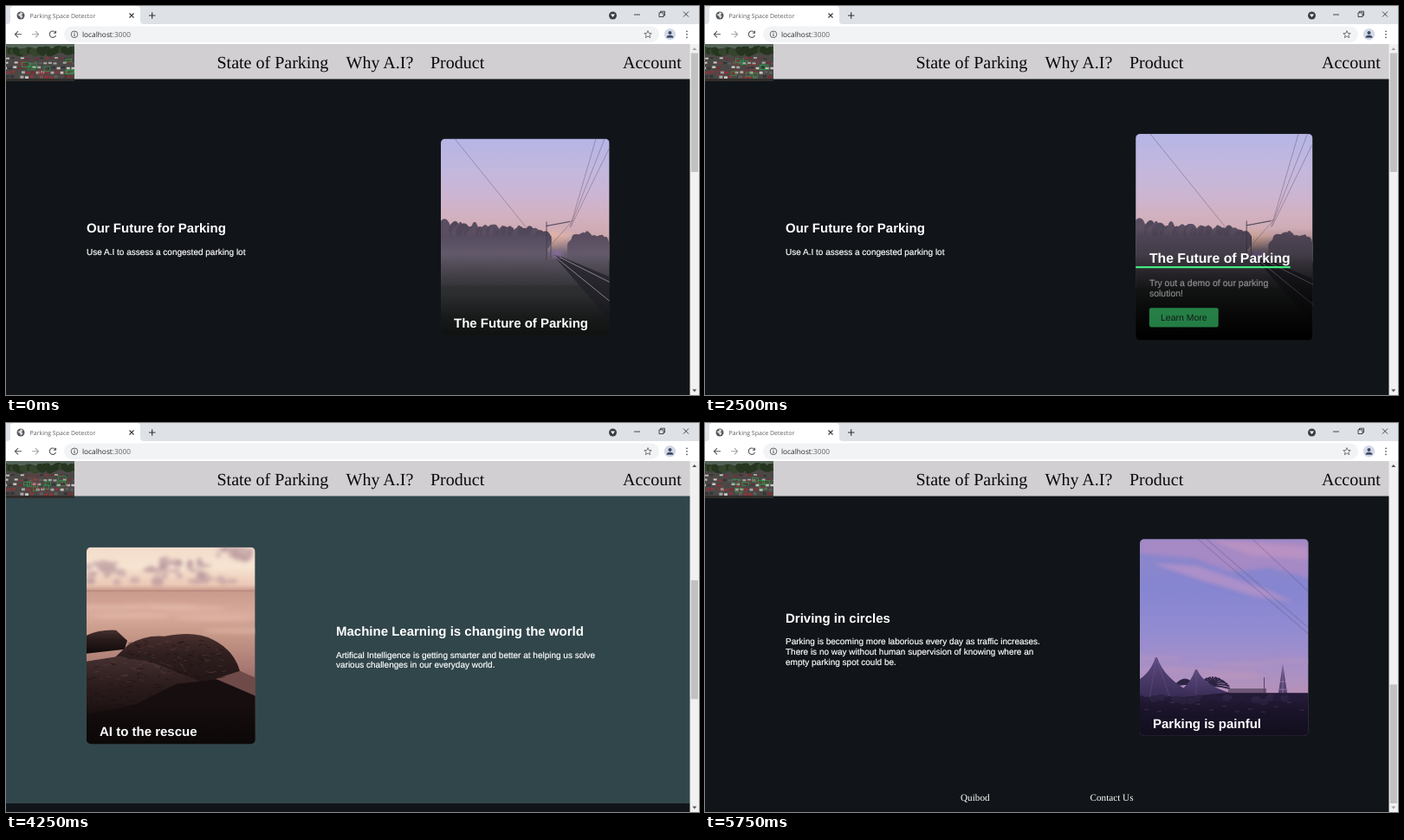
Write an HTML page that moves like this. It is 800 px wide and 450 px high and loops after 5800 ms.

```html
<!DOCTYPE html>
<html lang="en">
<head>
<meta charset="utf-8">
<title>Parking Space Detector</title>
<style>
  html, body { margin: 0; width: 100%; height: 100%; overflow: hidden; background: #111519; }
  svg { display: block; width: 800px; height: 450px; }
  text { white-space: pre; text-rendering: geometricPrecision; }
  .sans { font-family: "Liberation Sans", Arial, sans-serif; fill: #fff; }
  .serif { font-family: "Liberation Serif", "Times New Roman", serif; }
  .ui { font-family: "Open Sans", "Noto Sans", sans-serif; }
  .h { font-size: 15px; font-weight: 700; }
  .p { font-size: 10px; stroke: #fff; stroke-width: .18; }
  .dark { fill: #1d2a22; stroke: none; }
  .nav { font-size: 20px; fill: #0a0a0a; }
  .foot { font-size: 11.2px; fill: #fff; }
  .icon { fill: none; stroke: #55585d; stroke-width: 1.1; }
  .wire { fill: none; stroke: #4b4560; stroke-width: .5; opacity: .75; }
</style>
</head>
<body>
<svg id="stage" viewBox="0 0 800 450" xmlns="http://www.w3.org/2000/svg"></svg>
<script>
const LOOP = 5800, STEP = 50;
const HOVER_ON = 1250, HOVER_OFF = 3033, FADE = 500;
const CARD_W = 194.6, CARD_H = 227.6, SLIDE = 76.7;
const MAX_SCROLL = 731;
const SCROLL = [[3250, 0], [3750, 186], [4250, 375.5], [5100, 612.5], [5650, MAX_SCROLL]];

function seeded(seed) {
  return () => {
    seed = (seed * 1664525 + 1013904223) >>> 0;
    return seed / 4294967296;
  };
}
const clamp = v => Math.max(0, Math.min(1, v));
const repeat = (n, fn) => Array.from({ length: n }, (_, i) => fn(i)).join('');

// cubic-bezier(.25, .1, .25, 1)
function ease(x) {
  x = clamp(x);
  let lo = 0, hi = 1, s = x;
  for (let i = 0; i < 24; i++) {
    s = (lo + hi) / 2;
    const bx = .75 * s * (1 - s) + s * s * s;
    if (bx < x) lo = s; else hi = s;
  }
  return .3 * s * (1 - s) ** 2 + 3 * s * s * (1 - s) + s ** 3;
}

function hover(t, delay, curve) {
  return t < HOVER_OFF
    ? curve((t - HOVER_ON - delay) / FADE)
    : 1 - curve((t - HOVER_OFF) / FADE);
}

const slope = i => (SCROLL[i + 1][1] - SCROLL[i][1]) / (SCROLL[i + 1][0] - SCROLL[i][0]);
const tangent = i => i === 0 || i === SCROLL.length - 1 ? 0 : (slope(i - 1) + slope(i)) / 2;

function scrollAt(t) {
  const last = SCROLL.length - 1;
  if (t <= SCROLL[0][0]) return 0;
  if (t >= SCROLL[last][0]) return MAX_SCROLL;
  const i = SCROLL.findIndex((p, k) => k < last && t < SCROLL[k + 1][0]);
  const [t0, a] = SCROLL[i], [t1, b] = SCROLL[i + 1];
  const d = t1 - t0, u = (t - t0) / d, v = 1 - u;
  return a * v * v * (1 + 2 * u) + b * u * u * (3 - 2 * u)
    + d * u * v * (v * tangent(i) - u * tangent(i + 1));
}

const gradient = (id, ...stops) =>
  `<linearGradient id="${id}" x2="0" y2="1">` + stops.map(([at, color, alpha = 1]) =>
    `<stop offset="${at}" stop-color="${color}" stop-opacity="${alpha}"/>`).join('') + '</linearGradient>';
const text = (x, y, cls, str, extra = '') => `<text x="${x}" y="${y}" class="${cls}" ${extra}>${str}</text>`;
const rect = (x, y, w, h, fill, extra = '') =>
  `<rect x="${x}" y="${y}" width="${w}" height="${h}" fill="${fill}" ${extra}/>`;
const path = (d, fill, extra = '') => `<path d="${d}" fill="${fill}" ${extra}/>`;
const wires = d => `<path class="wire" d="${d}"/>`;
const blob = (x, y, rx, ry, fill, extra = '') =>
  `<ellipse cx="${x}" cy="${y}" rx="${rx}" ry="${ry}" fill="${fill}" ${extra}/>`;

const defs = '<defs>'
  + gradient('shade', [0, '#000', 0], [.2, '#000', .3], [1, '#000'])
  + gradient('dawn', [0, '#b5b5e5'], [.25, '#c2b8de'], [.48, '#ccb5d2'], [.64, '#d2b1c0'], [.8, '#cda9b0'], [1, '#b8a0ad'])
  + gradient('mist', [0, '#62586c', 0], [.35, '#655b6d', .9], [.55, '#544e5a'], [1, '#35353a'])
  + gradient('field', [0, '#3d3b42'], [.35, '#2d2f30'], [1, '#1d2020'])
  + gradient('dusk', [0, '#f2dccb'], [.1, '#f7e4d2'], [.19, '#ecc9b6'], [.22, '#c99a8c'],
      [.27, '#cfa193'], [.34, '#d9ab9c'], [.45, '#c59787'], [.6, '#ab7b74'], [.75, '#8a5f5b'], [1, '#3f2a2a'])
  + gradient('rock', [0, '#4a302e'], [.3, '#2f1f1f'], [.7, '#231616'], [1, '#150d0d'])
  + gradient('reef', [0, '#453030'], [.4, '#2a1b1b'], [1, '#100a0b'])
  + gradient('eve', [0, '#8d87cb'], [.25, '#8685d0'], [.45, '#918bd2'], [.62, '#a48fc9'], [.74, '#b192bd'], [.82, '#b88fb0'])
  + gradient('tent', [0, '#5d4a80'], [1, '#2f2449'])
  + '<radialGradient id="sun"><stop stop-color="#f5bfa0"/><stop offset="1" stop-color="#e6b3a6" stop-opacity="0"/></radialGradient>'
  + '<filter id="soft" x="-20%" y="-20%" width="140%" height="140%"><feGaussianBlur stdDeviation="2"/></filter>'
  + `<clipPath id="frame"><rect width="${CARD_W}" height="${CARD_H}" rx="5"/></clipPath>`
  + '<clipPath id="thumb"><rect y="44" width="79" height="43"/></clipPath>'
  + '</defs>';

function railway() {
  const r = seeded(7);
  return rect(0, 0, CARD_W, 140, 'url(#dawn)')
    + blob(130, 121, 34, 20, 'url(#sun)')
    + wires('M16 0L98 102M179 0L149 103M189 0L152 95L128 122M194 12L150 102M121 101L152 95')
    + repeat(60, i => {
      const x = i * 2.05;
      return blob(x, 104 + x * .07 + r() * 6, 3 + r() * 4, 6 + r() * 6, r() < .5 ? '#51475a' : '#5a4e60');
    })
    + rect(0, 112, 123, 30, '#564c5f')
    + repeat(24, i => blob(150 + i * 2.1, 119 - 4 * Math.sin(i / 5) + r() * 5, 4, 6 + r() * 4, '#594c5e'))
    + rect(146, 122, 50, 20, '#594d60')
    + rect(0, 142, CARD_W, 86, 'url(#field)')
    + rect(0, 112, CARD_W, 58, 'url(#mist)')
    + path('M129 134L195 210V160L138 136Z', '#211f27', 'opacity=".75"')
    + path('M130 135L195 188M137 137L195 166', 'none', 'stroke="#a59aac" stroke-width=".8"')
    + path('M122 96V140M127 112V138M122 101L149 96', 'none', 'stroke="#41384c" stroke-width=".8"')
    + blob(134, 133, 7, 4, '#8a70a9', 'opacity=".7" filter="url(#soft)"');
}

function shore() {
  const r = seeded(21);
  const puffs = (n, x, y, w, h) => repeat(n, () =>
    blob(x + r() * w, y + r() * h, 3 + r() * 5, 2 + r() * 3, '#b3929a', 'opacity=".5"'));
  const cracks = (n, x, y, w, h, color) => repeat(n, () => {
    const cx = x + r() * w, cy = y + r() * h;
    return path(`M${cx} ${cy}l${2 + r() * 5} ${r() * 5 - 2}`, 'none', `stroke="${color}" opacity=".45"`);
  });
  return rect(0, 0, CARD_W, CARD_H, 'url(#dusk)')
    + '<g filter="url(#soft)">'
    + puffs(16, 0, 16, 42, 18) + puffs(26, 72, 12, 66, 24) + puffs(14, 152, 0, 40, 14)
    + puffs(14, 0, 36, 195, 6)
    + repeat(6, i => blob(20 + i * 32, 62 + r() * 36, 45, 3, '#e6beae', 'opacity=".45"'))
    + '</g>'
    + rect(0, 50, CARD_W, .8, '#a97f76')
    + path('M0 102Q15 95 34 96L47 108L44 118L0 123Z', 'url(#reef)')
    + path('M28 132L48 113Q67 101 90 103Q126 96 146 107Q170 119 177 143L160 158L100 178L30 150Z', 'url(#rock)')
    + path('M150 152L177 143L195 151V180L150 170Z', '#6e4a48')
    + path('M0 132L38 126L78 134L118 150L140 159L62 218L0 218Z', 'url(#reef)')
    + path('M0 193L56 182L104 158L151 153L195 172V228H0Z', '#170e0f')
    + cracks(70, 46, 108, 112, 44, '#140c0c')
    + cracks(40, 50, 106, 112, 40, '#694842')
    + cracks(40, 0, 134, 90, 50, '#120b0b')
    + cracks(20, 6, 130, 84, 26, '#5f423e');
}

function fair() {
  const r = seeded(4);
  const palm = (x, y, size) => repeat(13, i => {
    const a = Math.PI * (1 + i / 12), c = Math.cos(a) * size, s = Math.sin(a) * size;
    return path(`M${x} ${y}Q${x + c * .5} ${y + s * .8} ${x + c} ${y + s * .5 + 3}`, 'none',
      'stroke="#2c2343" stroke-width="1.8"');
  });
  return rect(0, 0, CARD_W, CARD_H, 'url(#eve)')
    + '<g filter="url(#soft)">'
    + path('M0 0H195V45L150 33L104 38L62 22L0 17Z', '#b48cc2', 'opacity=".65"')
    + path('M14 28L66 31L143 57L178 73L132 66L72 48Z', '#bd95c8', 'opacity=".7"')
    + path('M80 0L195 9V24L128 19Z', '#c898c0', 'opacity=".55"')
    + repeat(8, () => blob(r() * 195, 125 + r() * 42, 38, 3, '#c298bb', 'opacity=".3"'))
    + '</g>'
    + wires('M67 0L195 110M77 0L195 103M130 0L195 61')
    + palm(84, 170, 20) + palm(52, 168, 12)
    + rect(102, 173, 44, 9, '#6d5675') + rect(143, 160, 1, 19, '#554369')
    + path('M165 145L159 184H171Z', '#554371')
    + path('M165 146V183M162 165H168M161 174H169', 'none', 'stroke="#a683af" stroke-width=".7"')
    + path('M39 180Q57 171 64 151L66 151Q74 169 104 178V192H39Z', 'url(#tent)')
    + path('M0 162Q13 153 18 137L20 137Q28 162 62 179V195H0Z', 'url(#tent)')
    + path('M19 138L11 186M19 138L35 184M65 152V184', 'none', 'stroke="#765f92" stroke-width=".6" opacity=".6"')
    + path('M0 186L60 182L100 178H195V228H0Z', '#221a36')
    + repeat(24, i => blob(i * 8.4, 183 + r() * 6, 6, 4, r() < .5 ? '#251c3a' : '#2e2344'))
    + repeat(13, i => rect(5 + i * 15, 186 + r() * 14, 5, 1.2, '#67547a', 'opacity=".45"'));
}

function card(x, y, photo, title, active) {
  const details = active
    ? rect(0, 146, 170, 2, '#42f584', 'id="underline"')
      + '<g id="details">'
      + text(15, 167.4, 'sans p', 'Try out a demo of our parking')
      + text(15, 178.9, 'sans p', 'solution!')
      + rect(15, 191.8, 76, 21.2, '#42f584', 'rx="2"')
      + text(27.5, 206, 'sans p dark', 'Learn More')
      + '</g>'
    : '';
  return `<g transform="translate(${x} ${y})"><g ${active ? 'id="card"' : ''}><g clip-path="url(#frame)">`
    + photo
    + `<g ${active ? 'id="content"' : ''} transform="translate(0 ${SLIDE})">`
    + rect(0, 103.9, CARD_W, 123.7, 'url(#shade)')
    + text(15, 141.7, 'sans h', title) + details
    + '</g></g></g></g>';
}

const copy = (x, y, title, lines) => text(x, y, 'sans h', title)
  + lines.map((line, i) => text(x, y + 25.5 + i * 11.75, 'sans p', line)).join('');

const page = '<g id="page">'
  + rect(0, 44, 790, 1200, '#111519')
  + rect(0, 450, 790, 365.5, '#31464b')
  + copy(93, 262, 'Our Future for Parking', ['Use A.I to assess a congested parking lot'])
  + card(502, 153.5, railway(), 'The Future of Parking', true)
  + copy(381, 621.7, 'Machine Learning is changing the world',
    ['Artifical Intelligence is getting smarter and better at helping us solve',
     'various challenges in our everyday world.'])
  + card(93, 519.2, shore(), 'AI to the rescue')
  + copy(93, 961.7, 'Driving in circles',
    ['Parking is becoming more laborious every day as traffic increases.',
     'There is no way without human supervision of knowing where an',
     'empty parking spot could be.'])
  + card(502, 865.2, fair(), 'Parking is painful')
  + text(295, 1167.5, 'serif foot', 'Quibod')
  + text(444.5, 1167.5, 'serif foot', 'Contact Us')
  + '</g>';

function lot() {
  const r = seeded(33);
  const paint = ['#a9a5a5', '#7d2b30', '#c9c5c4', '#8c3439', '#33353a', '#5f5d5c', '#4a4847'];
  return '<g clip-path="url(#thumb)">' + rect(0, 44, 79, 43, '#4b4846')
    + rect(0, 44, 79, 5, '#56655a')
    + repeat(30, i => blob(i * 2.8, 50 + r() * 5, 4, 4, r() < .6 ? '#26351f' : '#36452d'))
    + repeat(5, row => repeat(15, i => rect(i * 5.6 - row * 1.5, 59 + row * 5.2 + r() * 1.5,
      4, 1.8 + row * .35, paint[Math.floor(r() * paint.length)])))
    + rect(0, 84, 79, 3, '#302d2b')
    + '<g id="boxes"></g></g>';
}

const navbar = rect(0, 44, 790, 40.5, '#d1cfd1') + lot()
  + [[243.5, 'State of Parking'], [392.5, 'Why A.I?'], [490, 'Product'], [712, 'Account']]
    .map(([x, label]) => text(x, 72, 'serif nav', label)).join('');

const scrollbar = rect(789.5, 44, 10.5, 406, '#f1f1f1')
  + rect(790.8, 54.5, 8.2, 137.5, '#c1c1c1', 'id="bar"')
  + path('M792.3 51L794.8 48L797.3 51Z', '#505050', 'id="up"')
  + path('M792.3 443.5L794.8 446.5L797.3 443.5Z', '#505050', 'id="down"');

const icon = (d, extra = '') => `<path class="icon" d="${d}" ${extra}/>`;
const browser = rect(0, 0, 800, 22, '#dee1e6') + rect(0, 21, 800, 23, '#fff')
  + path('M1 21Q5 21 5 17V4Q5 0 9 0H151Q155 0 155 4V17Q155 21 159 21Z', '#fff')
  + blob(17, 11, 4.5, 4.5, '#55585d')
  + path('M13.5 10L16 9L17 7L19.5 8.5L18 10.5L19.5 12L17.5 14.5L16 12Z', '#fff', 'opacity=".8"')
  + text(27.5, 13.6, 'ui', 'Parking Space Detector', 'font-size="7" fill="#5b5f64"')
  + icon('M142.5 8.5L147.5 13.5M147.5 8.5L142.5 13.5M165 11H172.5M168.7 7.2V14.8', 'style="stroke:#303236"')
  + blob(700.5, 11, 4.5, 4.5, '#3c4043')
  + path('M698 9.5H703L700.5 13Z', '#fff')
  + icon('M725 10H732M754 7.8H759V12.5H754ZM755.5 7.8V6.2H760.5V11H759M782 6.5L788 12.5M788 6.5L782 12.5', 'style="stroke:#222;stroke-width:.8"')
  + icon('M18 32.8H10.5M14 29.2L10.4 32.8L14 36.4')
  + icon('M30 32.8H37.5M34 29.2L37.6 32.8L34 36.4', 'style="stroke:#a2a5a9"')
  + icon('M57 30.5A3.7 3.7 0 1 0 57.5 34M57.5 28.7V31.3H54.8')
  + rect(67, 23.5, 687, 18.5, '#f1f3f4', 'rx="9.25"')
  + '<circle class="icon" cx="79" cy="32.8" r="3.8" style="stroke-width:.9"/>' + icon('M79 32.2V35M79 30.5V31.4')
  + text(88, 35.8, 'ui', 'localhost<tspan fill="#60646a">:3000</tspan>', 'font-size="8.3" fill="#25272b"')
  + icon('M741 28.6L742.2 31.5L745.2 31.7L742.9 33.7L743.6 36.7L741 35L738.4 36.7L739.1 33.7L736.8 31.7L739.8 31.5Z', 'style="stroke-width:.8"')
  + blob(766.5, 32.8, 6.7, 6.7, '#d3d9e8') + blob(766.5, 31, 2, 2, '#3f4b66')
  + path('M762.5 36.8Q762.5 33.8 766.5 33.8Q770.5 33.8 770.5 36.8Z', '#3f4b66')
  + [29.3, 32.8, 36.3].map(y => blob(786, y, .9, .9, '#55585d')).join('');

const $ = id => document.getElementById(id);
$('stage').innerHTML = defs + page + navbar + scrollbar + browser;

function detections(t) {
  const r = seeded(911 + Math.floor(t / 150) * 7919);
  const box = (color, x, y) =>
    rect(x.toFixed(1), y.toFixed(1), 5 + r() * 4, 3.5 + r() * 2, 'none', `stroke="${color}" stroke-width=".6"`);
  return repeat(5, () => box('#9c363b', r() * 70, 62 + r() * 16))
    + repeat(7, () => box('#2ba846', 12 + r() * 60, 61 + r() * 17));
}

function draw(t) {
  const y = scrollAt(t);
  const grow = hover(t, 0, ease);
  const scale = 1 + .05 * grow;
  const cx = CARD_W / 2, cy = CARD_H / 2;
  $('page').setAttribute('transform', `translate(0 ${-y})`);
  $('card').setAttribute('transform', `translate(${cx} ${cy}) scale(${scale}) translate(${-cx} ${-cy})`);
  $('underline').setAttribute('width', 170 * grow);
  $('content').setAttribute('transform', `translate(0 ${SLIDE * (1 - hover(t, FADE, ease))})`);
  $('details').setAttribute('opacity', hover(t, 2 * FADE, clamp));
  $('bar').setAttribute('y', 54.5 + 248 * y / MAX_SCROLL);
  $('up').setAttribute('fill', y > 0 ? '#505050' : '#a3a3a3');
  $('down').setAttribute('fill', y < MAX_SCROLL ? '#505050' : '#a3a3a3');
  $('boxes').innerHTML = detections(t);
}

const start = performance.now();
let shown = -1;
function tick() {
  const t = Math.floor((performance.now() - start) % LOOP / STEP) * STEP;
  if (t !== shown) draw(shown = t);
  requestAnimationFrame(tick);
}
tick();
</script>
</body>
</html>
```
